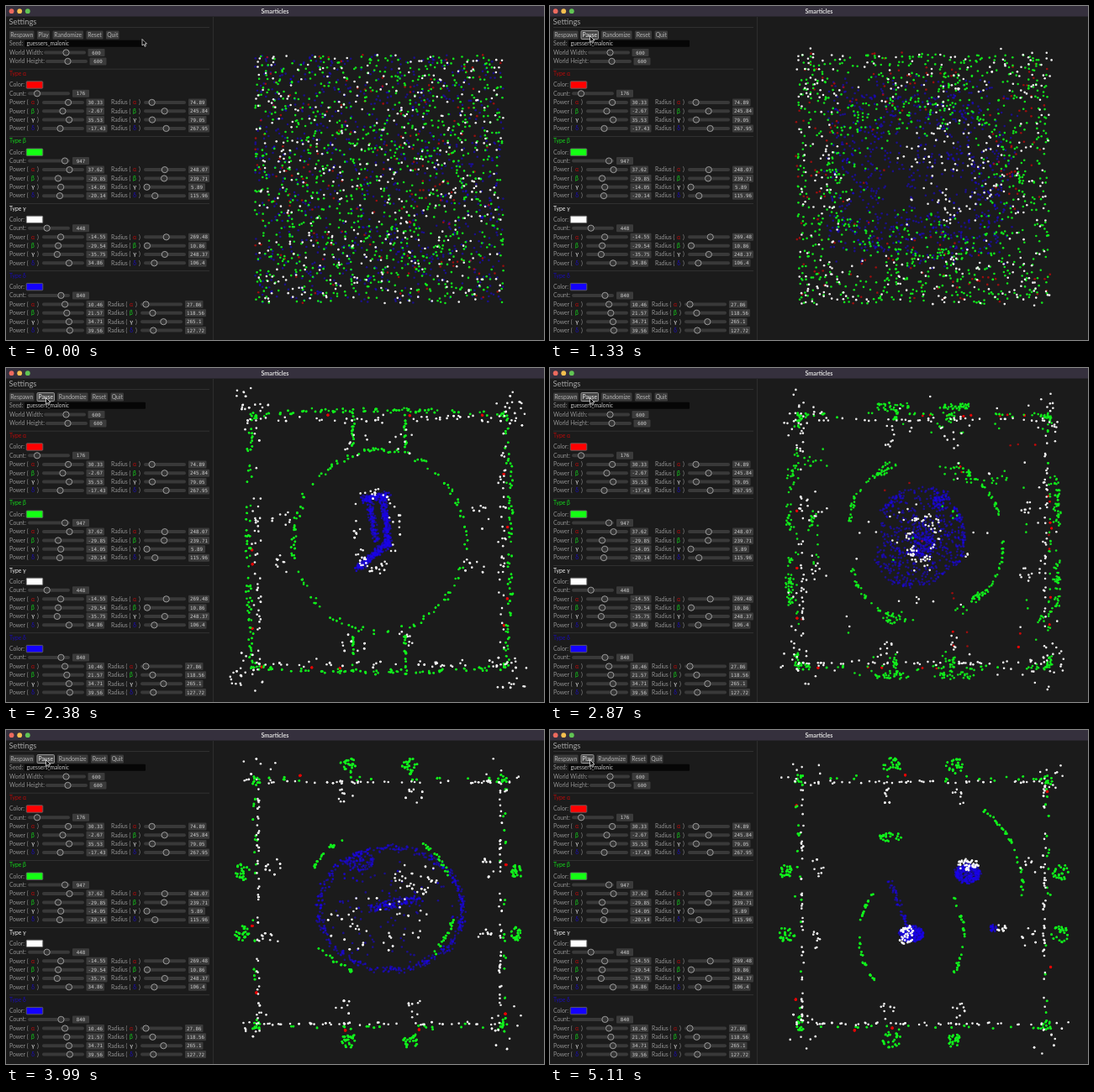
These frames come from a looping animation (640x398 px, 5.18 s). An HTML page with a canvas:

```html
<!DOCTYPE html>
<html lang="en">
<head>
<meta charset="utf-8">
<title>Smarticles</title>
<style>
  html, body { margin: 0; width: 100%; height: 100%; overflow: hidden; background: #1b1b1b; }
  canvas, svg { position: absolute; left: 0; top: 0; width: 640px; height: 398px; display: block; }
  text { font-family: Lato, "Open Sans", "Noto Sans", sans-serif; font-size: 6.8px; fill: #949494; }
  .mono { font-family: "DejaVu Sans Mono", monospace; font-size: 5.8px; fill: #cccccc; }
</style>
</head>
<body>
<canvas id="world" width="640" height="398"></canvas>
<svg id="ui" viewBox="0 0 640 398"></svg>
<script>
const LOOP = 5180, STEP = 70, START = 1085, STOP = 5075;
const CX = 444, CY = 206, HALF = 148;

let seed = 20231;
function rnd() {
  seed = (seed + 0x6D2B79F5) | 0;
  let x = Math.imul(seed ^ (seed >>> 15), 1 | seed);
  x = (x + Math.imul(x ^ (x >>> 7), 61 | x)) ^ x;
  return ((x ^ (x >>> 14)) >>> 0) / 4294967296;
}
const spread = w => (rnd() + rnd() - 1) * w;
const times = (n, fn) => { for (let i = 0; i < n; i++) fn(i); };

// Point beside the world's centre: `out` towards one of four sides, `along` that side.
function onSide(side, along, out) {
  const dx = [1, 0, -1, 0][side], dy = [0, 1, 0, -1][side];
  return [CX + dx * out - dy * along, CY + dy * out + dx * along];
}

// A swarm collects spots for each pose; settle() sends particles to the nearest ones.
class Swarm {
  constructor(color, alpha, count) {
    Object.assign(this, { color, alpha, count, poses: [] });
    this.at(START);
    times(count, () => this.add(CX + (rnd() * 2 - 1) * HALF, CY + (rnd() * 2 - 1) * HALF));
  }
  at(time) {
    this.spots = [];
    this.poses.push({ time, spots: this.spots });
    return this;
  }
  add(x, y) { this.spots.push([x, y]); return this; }
  line(n, w, x0, y0, x1, y1) {
    times(n, () => {
      const u = rnd();
      this.add(x0 + (x1 - x0) * u + spread(w), y0 + (y1 - y0) * u + spread(w));
    });
    return this;
  }
  blob(n, x, y, rx, ry = rx) {
    times(n, () => {
      const a = rnd() * 6.283, r = Math.sqrt(rnd());
      this.add(x + Math.cos(a) * r * rx, y + Math.sin(a) * r * ry);
    });
    return this;
  }
  arc(n, w, x, y, rx, ry, from = 0, to = 360) {
    times(n, () => {
      const a = (from + (to - from) * rnd()) * Math.PI / 180;
      this.add(x + Math.cos(a) * rx + spread(w), y + Math.sin(a) * ry + spread(w));
    });
    return this;
  }
  box(n, w, half, bow = 0) {
    times(n, i => {
      const u = rnd() * 2 - 1;
      this.add(...onSide(i % 4, u * half, half + bow * (1 - u * u) + spread(w)));
    });
    return this;
  }
  // Two clumps per side; they meet in the corners when along and out are equal.
  clumps(n, r, along, out) {
    times(8, i => this.blob(n, ...onSide(i % 4, i < 4 ? along : -along, out), r * (.6 + rnd() * .5), r));
    return this;
  }
  spokes(n, along, from, to) {
    for (const side of [1, 3]) for (const a of [along, -along])
      this.line(n, 2, ...onSide(side, a, from), ...onSide(side, a, to));
    return this;
  }
  quarterArcs(n, rx, ry) {
    times(4, q => this.arc(n, 3, CX, CY, rx, ry, 12 + q * 98, 45 + q * 98));
    return this;
  }
  settle() {
    let last = this.poses[0].place = this.poses[0].spots;
    for (const pose of this.poses.slice(1)) {
      const order = pose.spots.map(s => [rnd(), s]).sort((a, b) => a[0] - b[0]).map(p => p[1]);
      const free = last.map((_, i) => i);
      pose.place = [];
      for (let k = 0; free.length; k++) {
        const [x, y] = order[k % order.length];
        let best = 0, min = Infinity;
        free.forEach((id, j) => {
          const d = (last[id][0] - x) ** 2 + (last[id][1] - y) ** 2;
          if (d < min) { min = d; best = j; }
        });
        pose.place[free[best]] = [x + spread(.5), y + spread(.5)];
        free[best] = free[free.length - 1];
        free.pop();
      }
      last = pose.place;
    }
  }
  draw(ctx, t) {
    const { poses } = this;
    let k = 0;
    while (k < poses.length - 2 && t >= poses[k + 1].time) k++;
    const a = poses[k], b = poses[k + 1];
    const u = Math.min(1, Math.max(0, (t - a.time) / (b.time - a.time)));
    ctx.fillStyle = this.color;
    ctx.globalAlpha = this.alpha;
    a.place.forEach(([x, y], i) => {
      ctx.beginPath();
      ctx.arc(x + (b.place[i][0] - x) * u, y + (b.place[i][1] - y) * u, 1.3, 0, 6.283);
      ctx.fill();
    });
  }
}

const red = new Swarm('#e00808', .65, 176);
const green = new Swarm('#12f01c', .95, 947);
const white = new Swarm('#fafafa', .95, 448);
const blue = new Swarm('#1c06e8', .55, 840);
const [BURST, KNOT, BLOOM, WHEEL] = [1750, 2380, 3360, 3990];

// Green: a square frame with an inner ring, breaking up into clumps.
green.at(BURST).box(390, 3, 147, 5).clumps(5, 5, HALF, HALF)
  .spokes(20, 30, 105, 152).arc(130, 5, CX, CY, 114, 92);
green.at(KNOT).box(290, 4, 151, 5).clumps(3, 5, HALF, 151)
  .spokes(18, 31, 112, 158).arc(140, 4, CX, CY, 102, 108);
for (const t of [BLOOM, WHEEL, STOP])
  green.at(t).clumps(23, 10, 37, 163).clumps(6, 7, 146, 147).box(70, 5, HALF);
green.poses.slice(3, 5).forEach((pose, i) => {
  green.spots = pose.spots;
  green.quarterArcs(28 - 10 * i, 90, 86);
});
green.spots = green.poses[5].spots;
green.arc(36, 2, 470, 190, 92, 108, -62, 8).arc(34, 2, 430, 245, 62, 75, 135, 225)
  .arc(30, 2, 430, 245, 62, 75, -38, 38).blob(24, 405, 127, 13, 6);

// White: a loose frame, with a group that orbits and then joins the blue cores.
white.at(BURST).box(140, 7, 150).clumps(11, 16, 152, 158).clumps(7, 14, 32, 116)
  .arc(75, 5, 480, 195, 45, 38, -150, 100);
white.at(KNOT).box(170, 6, 146).clumps(10, 24, 155, 162).clumps(8, 18, 30, 118)
  .arc(60, 7, CX - 4, 195, 26, 46);
function whiteFrame(t) {
  return white.at(t).box(170, 2, 144).clumps(8, 12, 42, 127).clumps(6, 25, 142, 156);
}
whiteFrame(BLOOM).blob(52, 442, 212, 14).blob(24, CX, CY, 55, 40);
whiteFrame(WHEEL).blob(34, 488, 178, 28, 20).blob(44, CX, 232, 64, 35);
whiteFrame(STOP).blob(46, 497, 160, 13, 7).blob(48, 424, 245, 9, 13).blob(12, 537, 236, 9, 4);

// Blue: implodes, knots, bursts into a disk, then splits into two cores.
blue.at(BURST).blob(240, 433, 190, 10).blob(340, CX, 193, 66, 72)
  .arc(90, 9, CX, 190, 63, 66, 130, 260).line(80, 6, 433, 190, 478, 246);
blue.at(KNOT).line(160, 5, 424, 157, 455, 151).line(250, 5, 448, 152, 455, 212)
  .line(250, 5, 456, 207, 418, 239).line(120, 5, 432, 158, 440, 206);
blue.at(BLOOM).arc(200, 6, CX, 211, 87, 73).blob(350, CX, 211, 87, 73)
  .blob(150, CX, 213, 19, 15).blob(60, 476, 159, 16, 6);
blue.at(WHEEL).arc(420, 5, 458, 213, 86, 73).blob(90, 458, 213, 84, 71)
  .blob(80, 422, 156, 17, 11).line(130, 8, 434, 212, 492, 201);
blue.at(STOP).arc(170, 4, 497, 171, 13, 9).blob(150, 497, 171, 13, 9)
  .blob(320, 430, 243, 15, 10).line(45, 4, 404, 180, 424, 230).blob(24, 527, 236, 5, 4);

// Red: pushed out to the frame, where the green soon hides most of it.
red.at(BURST).box(32, 12, 154);
for (const t of [KNOT, BLOOM, WHEEL, STOP]) red.at(t).box(t < WHEEL ? 13 : 7, 5, 150);

const swarms = [blue, red, green, white];
swarms.forEach(s => s.settle());

// Panel
const ui = document.getElementById('ui');
function el(name, attrs, parent = ui) {
  const node = document.createElementNS('http://www.w3.org/2000/svg', name);
  for (const key in attrs) node.setAttribute(key, attrs[key]);
  return parent.appendChild(node);
}
const rect = (x, y, width, height, fill, rx = 0, parent) => el('rect', { x, y, width, height, fill, rx }, parent);
function label(str, x, y, style = '', parent) {
  const node = el('text', { x, y: y + 2.3, style }, parent);
  node.textContent = str;
  return node;
}
const rule = y => rect(4, y, 238, .7, '#3a3a3a');
function slider(x, y, knob) {
  rect(x, y - 2, 50, 4, '#393939', 2);
  el('circle', { cx: knob, cy: y, r: 3.6, fill: '#353535', stroke: '#a8a8a8', 'stroke-width': .9 });
}
function value(str, x, y) {
  const w = Math.max(20, str.length * 3.5 + 4);
  rect(x, y - 4.5, w, 9, '#3b3b3b', 1);
  label(str, x + w / 2, y - .2, 'text-anchor:middle').setAttribute('class', 'mono');
}

rect(0, 0, 246, 398, '#1b1b1b');
rect(246, 13, .8, 385, '#333333');
rect(0, 0, 640, 12.5, '#35303d');
['#ed6a5e', '#f5bf4f', '#61c554'].forEach((fill, i) => el('circle', { cx: 6.6 + i * 9.6, cy: 6.2, r: 2.9, fill }));
label('Smarticles', 320, 6.6, 'text-anchor:middle;font-weight:700;font-size:7.2px;fill:#dedede');

label('Settings', 3.5, 19.3, 'font-size:9.4px;fill:#a6a6a6');
rule(25);

function buttons(toggle, width) {
  const g = el('g', {});
  let x = 4;
  for (const [str, w] of [['Respawn', 29.5], [toggle, width], ['Randomize', 36.5], ['Reset', 20], ['Quit', 15.5]]) {
    const box = rect(x, 29.5, w, 10, '#3b3b3b', 1.2, g);
    const text = label(str, x + w / 2, 34.4, 'text-anchor:middle;fill:#b2b2b2', g);
    if (str === toggle) g.hot = { box, text };
    x += w + 3.5;
  }
  return g;
}
const idle = buttons('Play', 15);
const running = buttons('Pause', 20.5);
function hover(g, on) {
  const { box, text } = g.hot;
  box.setAttribute('fill', on ? '#474747' : '#3b3b3b');
  box.setAttribute('stroke', on ? '#b0b0b0' : 'none');
  box.setAttribute('stroke-width', .8);
  text.style.fill = on ? '#f0f0f0' : '#b2b2b2';
}

label('Seed:', 4, 44.8);
rect(22, 40.8, 144, 8, '#060606', 1);
label('guessers_malonic', 24.5, 44.6, 'fill:#c8c8c8;font-size:6.6px');
['World Width:', 'World Height:'].forEach((str, i) => {
  const y = 55.5 + i * 10.4, x = 45 + i * 2;
  label(str, 4, y);
  slider(x, y, x + 26.5);
  value('600', x + 52.5, y);
});

const types = [
  { name: 'α', ink: '#b80a0a', fill: '#ff0000' },
  { name: 'β', ink: '#14d81c', fill: '#14ff14' },
  { name: 'γ', ink: '#f0f0f0', fill: '#ffffff' },
  { name: 'δ', ink: '#1a0cb0', fill: '#1400ff' }
];
function section(k, count, powers, radii) {
  const y = 75.3 + k * 80.2, dx = k === 3 ? -4 : 0;
  const { name, ink, fill } = types[k];
  rule(y - .5);
  label('Type ' + name, 4, y + 5.6, 'fill:' + ink);
  label('Color:', 4, y + 18.8);
  el('rect', { x: 24.2, y: y + 14.5, width: 19.6, height: 8.4, rx: 1, fill, stroke: '#626262', 'stroke-width': .9 });
  label('Count:', 4, y + 29);
  slider(26, y + 29, 29.5 + count * .0428);
  value(String(count), 79, y + 29);
  types.forEach((other, i) => {
    const row = y + 39.6 + i * 10.35;
    const style = 'text-anchor:middle;fill:' + other.ink;
    label('Power (', 4, row);
    label(other.name, 32, row, style);
    label(')', 37, row);
    slider(43, row, 68 + powers[i] * .2);
    value(String(powers[i]), 95.5, row);
    label('Radius (', 125 + dx, row);
    label(other.name, 153 + dx, row, style);
    label(')', 158 + dx, row);
    slider(164 + dx, row, 167 + dx * .75 + radii[i] * .088);
    value(String(radii[i]), 217 + dx, row);
  });
}
section(0, 176, [30.33, -2.67, 35.53, -17.43], [74.89, 245.84, 79.05, 267.95]);
section(1, 947, [37.62, -29.85, -14.05, -20.14], [248.07, 239.71, 5.89, 115.96]);
section(2, 448, [-14.55, -29.54, -35.75, 34.86], [269.48, 10.86, 248.37, 106.4]);
section(3, 840, [10.46, 21.57, 34.71, 39.56], [27.86, 118.56, 265.1, 127.72]);

const cursor = el('path', {
  d: 'M0 0V7.6L1.8 6L3 8.8L4.3 8.2L3.1 5.5H5.5Z',
  fill: '#000', stroke: '#fff', 'stroke-width': .7
});

const ctx = document.getElementById('world').getContext('2d');
function render(ms) {
  const t = Math.floor(ms % LOOP / STEP) * STEP;
  ctx.clearRect(0, 0, 640, 398);
  swarms.forEach(s => s.draw(ctx, t));

  const playing = t >= START && t < STOP;
  idle.style.display = playing ? 'none' : '';
  running.style.display = playing ? '' : 'none';

  const u = Math.min(1, t / 700), e = u * u * (3 - 2 * u);
  const x = 162 - 114.5 * e, y = 39.5 - 4 * e;
  cursor.setAttribute('transform', `translate(${x} ${y})`);
  hover(idle, x < 52);
  hover(running, true);
}

const begin = performance.now();
function tick() {
  render(performance.now() - begin);
  requestAnimationFrame(tick);
}
tick();
</script>
</body>
</html>
```
